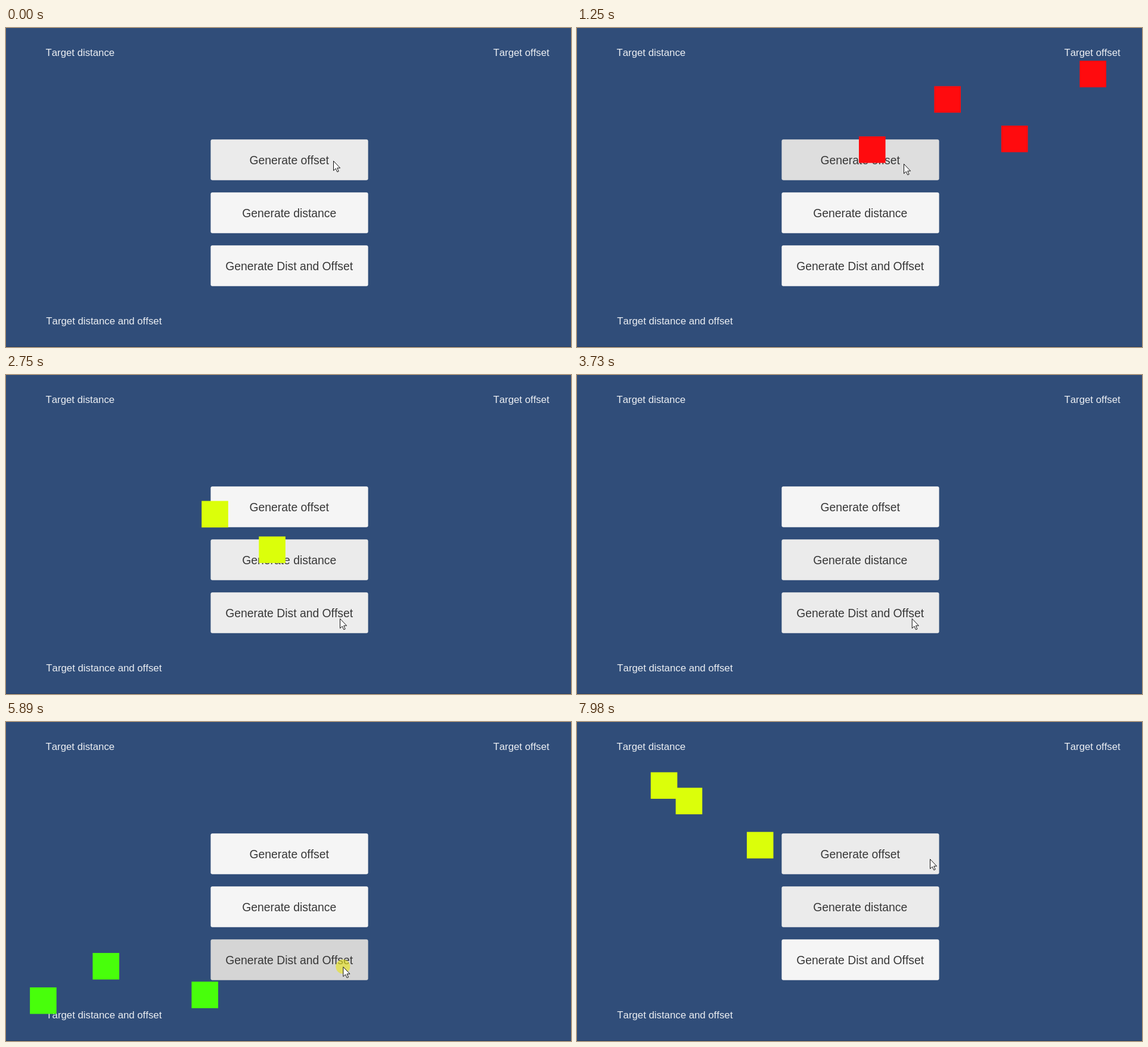
Recreate the animation shown at these times as an HTML page. Size 948 px wide and 536 px high, loop 8000 ms.

```html
<!DOCTYPE html>
<html lang="en">
<head>
<meta charset="utf-8">
<title>Spawner</title>
<style>
  html, body { margin: 0; width: 100%; height: 100%; overflow: hidden; background: #304d79; }
  svg { display: block; width: 100vw; height: 100vh; }
  text { font-family: "Liberation Sans", Arial, sans-serif; font-kerning: none; font-variant-ligatures: none; }
  .label { font-size: 16.8px; fill: #eceff3; }
  .caption { font-size: 19.35px; fill: #383838; text-anchor: middle; }
</style>
</head>
<body>
<svg viewBox="0 0 948 536">
  <rect width="948" height="536" fill="#304d79"/>
  <rect y="535" width="948" height="1" fill="#283f62"/>
  <text class="label" x="66.5" y="46.5">Target distance</text>
  <text class="label" x="817.5" y="46.5">Target offset</text>
  <text class="label" x="67.3" y="497.5">Target distance and offset</text>
  <g id="buttons"></g>
  <g id="squares"></g>
  <circle id="halo" r="12" fill="#e8e41c" opacity="0.62"/>
  <path id="cursor" d="M.5 .5V16.6L4.2 13.2L6.8 18.8L9.2 17.8L6.7 12.2H11.6Z"
        fill="#fff" stroke="#111" stroke-width="1"/>
</svg>
<script>
const LOOP = 8000, SIZE = 44.6, HOLD = 150, FADE = 110;
const LEFT = 343.4, TOP = 187.3, STEP = 89, WIDTH = 264.2, HEIGHT = 68.4;
const NS = 'http://www.w3.org/2000/svg';
const $ = id => document.getElementById(id);

function add(parent, tag, attrs) {
  const el = document.createElementNS(NS, tag);
  for (const k in attrs) el.setAttribute(k, attrs[k]);
  return parent.appendChild(el);
}

const smooth = v => v * v * (3 - 2 * v);
const linear = v => v;
const glide = v => smooth(v ** .93);

// Eased value between [time, value, value...] keys
function follow(keys, t) {
  let i = 0;
  while (i < keys.length - 2 && t > keys[i + 1][0]) i++;
  const a = keys[i], b = keys[i + 1];
  const u = smooth(Math.max(0, Math.min(1, (t - a[0]) / (b[0] - a[0]))));
  return a.slice(1).map((v, k) => v + (b[k + 1] - v) * u);
}

// One sideways swing shared by all squares, scaled by each launcher's sway
const swing = [[0, 0], [.26, -1], [.59, 1], [1, 0]];

const pointer = [
  [0, 549, 223], [1250, 548, 228], [1640, 556, 308], [2600, 558, 326], [2740, 560, 409],
  [4910, 564, 409], [6500, 566, 412], [7040, 576, 325], [7560, 584, 336], [7980, 592, 230]
];

// clicks are the moments of release
const launchers = [
  { caption: 'Generate offset', color: '#ff0b0e', to: [912, 40.5],
    life: 1165, ease: linear, sway: 78, clicks: [226, 628, 821, 1188] },
  { caption: 'Generate distance', color: '#dbff0a', to: [39.5, 40.5],
    life: 1100, ease: glide, sway: 0, clicks: [2392, 2602, 7257, 7337, 7545] },
  { caption: 'Generate Dist and Offset', color: '#48ff0b', to: [40, 491],
    life: 1100, ease: glide, sway: -53, clicks: [4107, 4966, 5229, 5491, 5975, 6096] }
];

launchers.forEach((l, i) => {
  l.y = TOP + STEP * i;
  l.from = [475, l.y + 35];
  l.box = add($('buttons'), 'rect', { x: LEFT, y: l.y, width: WIDTH, height: HEIGHT, rx: 3,
    stroke: '#26405f', 'stroke-opacity': .2, 'paint-order': 'stroke' });
  add($('buttons'), 'text', { class: 'caption', x: 475.2, y: l.y + 41.3 }).textContent = l.caption;
  l.squares = l.clicks.map(() =>
    add($('squares'), 'rect', { width: SIZE, height: SIZE, fill: l.color }));
});

function place(l, u) {
  const dx = l.to[0] - l.from[0], dy = l.to[1] - l.from[1];
  const n = Math.hypot(dx, dy) * Math.sign(dx);
  const s = l.ease(u), d = l.sway * follow(swing, u)[0];
  return [l.from[0] + dx * s - dy / n * d, l.from[1] + dy * s + dx / n * d];
}

const isPressed = (l, t) => l.clicks.some(c => t >= c - HOLD && t < c);
const lastPress = (l, t) => Math.max(-1, ...l.clicks.map(c => c - HOLD).filter(p => p <= t));

function isSelected(l, t) {
  const p = lastPress(l, t);
  return p >= 0 && launchers.every(o => lastPress(o, t) <= p);
}

function isHovered(l, t) {
  const y = follow(pointer, t)[1];
  return y >= l.y && y <= l.y + HEIGHT;
}

const tone = (l, t) =>
  isPressed(l, t) ? 200 : isHovered(l, t) || isSelected(l, t) ? 235 : 245;

// Averaging the recent tones gives a linear cross-fade
function shade(l, t) {
  const n = 11;
  let sum = 0;
  for (let i = 0; i < n; i++) sum += tone(l, t - FADE * i / n);
  const v = Math.round(sum / n);
  return `rgb(${v},${v},${v})`;
}

function draw(t) {
  for (const l of launchers) {
    l.box.setAttribute('fill', shade(l, t));
    l.clicks.forEach((c, i) => {
      const u = (t - c) / l.life, el = l.squares[i];
      const alive = u >= 0 && u < 1;
      el.style.display = alive ? '' : 'none';
      if (!alive) return;
      const [x, y] = place(l, u);
      el.setAttribute('x', (x - SIZE / 2).toFixed(2));
      el.setAttribute('y', (y - SIZE / 2).toFixed(2));
    });
  }
  const at = `translate(${follow(pointer, t).map(v => v.toFixed(2)).join(' ')})`;
  $('cursor').setAttribute('transform', at);
  $('halo').setAttribute('transform', at);
  $('halo').style.display = launchers.some(l => isPressed(l, t)) ? '' : 'none';
}

const start = performance.now();
function tick() {
  draw((performance.now() - start) % LOOP);
  requestAnimationFrame(tick);
}
tick();
</script>
</body>
</html>
```
